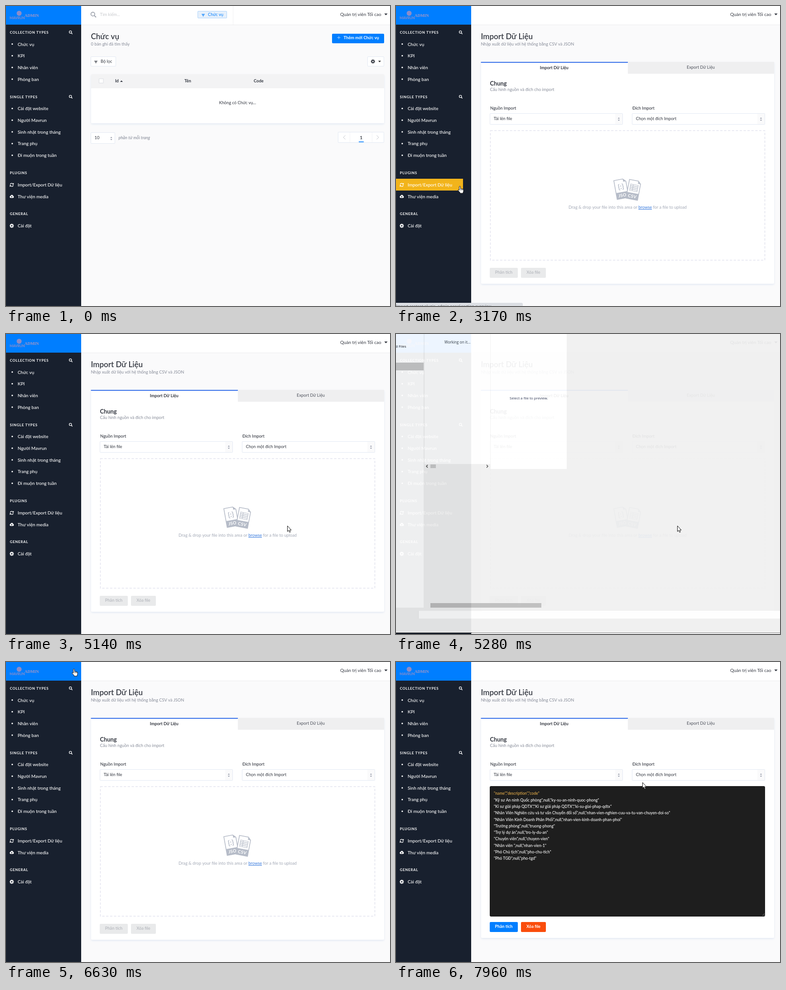
These frames come from a looping animation (848 by 660 pixels, 8 s). An HTML page with a canvas:

```html
<!DOCTYPE html>
<html lang="vi">
<head>
<meta charset="utf-8">
<title>Import</title>
<style>
html, body { margin: 0; width: 100%; height: 100%; overflow: hidden; background: #fafafb; }
canvas { display: block; width: 848px; height: 660px; }
</style>
</head>
<body>
<canvas id="stage" width="848" height="660"></canvas>
<script>
const W = 848, H = 660, LOOP = 8000;
const BLUE = '#007eff', INK = '#333740', MUTED = '#868b98', EDGE = '#e3e9f3';
const UI = 'Lato, sans-serif', WIN = '"Open Sans", sans-serif', MONO = '"DejaVu Sans Mono", monospace';
const stage = document.getElementById('stage').getContext('2d');
const layerCanvas = document.createElement('canvas');
layerCanvas.width = W;
layerCanvas.height = H;
const layer = layerCanvas.getContext('2d');
let g = stage;

const rows = [
  ['Kỹ sư An ninh Quốc phòng', '', 'ky-su-an-ninh-quoc-phong'],
  ['Kĩ sư giải pháp QDTX', 'Kĩ sư giải pháp QDTX', 'ki-su-giai-phap-qdtx'],
  ['Nhân Viên Nghiên cứu và tư vấn Chuyển đổi số', '', 'nhan-vien-nghien-cuu-va-tu-van-chuyen-doi-so'],
  ['Nhân Viên Kinh Doanh Phân Phối', '', 'nhan-vien-kinh-doanh-phan-phoi'],
  ['Trưởng phòng', '', 'truong-phong'],
  ['Trợ lý dự án', '', 'tro-ly-du-an'],
  ['Chuyên viên', '', 'chuyen-vien'],
  ['Nhân viên ', '', 'nhan-vien-1'],
  ['Phó Chủ tịch', '', 'pho-chu-tich'],
  ['Phó TGĐ', '', 'pho-tgd']
].map(([name, about, code]) => `"${name}",${about ? `"${about}"` : 'null'},"${code}"`);

// Drawing helpers
function rect(x, y, w, h, color, r = 0) {
  g.fillStyle = color;
  g.beginPath();
  g.roundRect(x, y, w, h, r);
  g.fill();
}
function box(x, y, w, h, fill = '#fff', edge = EDGE, r = 2) {
  rect(x, y, w, h, edge, r);
  rect(x + 1, y + 1, w - 2, h - 2, fill, Math.max(0, r - 1));
}
function text(s, x, y, size = 9.3, color = INK, { weight = 400, font = UI, align = 'left', style = '', gap = 0 } = {}) {
  g.font = `${style} ${weight} ${size}px ${font}`;
  g.textAlign = align;
  g.letterSpacing = gap + 'px';
  g.fillStyle = color;
  g.fillText(s, x, y);
  return g.measureText(s).width;
}
function line(points, color, width = 1) {
  g.strokeStyle = color;
  g.lineWidth = width;
  g.beginPath();
  points.forEach(([x, y]) => g.lineTo(x, y));
  g.stroke();
}
function poly(points, color) {
  g.fillStyle = color;
  g.beginPath();
  points.forEach(([x, y]) => g.lineTo(x, y));
  g.fill();
}
function dot(x, y, r, color) {
  g.fillStyle = color;
  g.beginPath();
  g.arc(x, y, r, 0, 7);
  g.fill();
}
const caret = (x, y, w, h, color = INK) => poly([[x - w, y], [x + w, y], [x, y + h]], color);
function card(x, y, w, h) {
  g.save();
  g.shadowColor = '#e3e9f3';
  g.shadowBlur = 4;
  g.shadowOffsetY = 2;
  rect(x, y, w, h, '#fff', 2);
  g.restore();
}

// Icons
function magnifier(x, y, r, color, width) {
  g.strokeStyle = color;
  g.lineWidth = width;
  g.beginPath();
  g.arc(x - r * .3, y - r * .3, r, 0, 7);
  g.stroke();
  line([[x + r * .45, y + r * .45], [x + r * 1.4, y + r * 1.4]], color, width * 1.2);
}
function funnel(x, y, color) {
  [7, 5, 3, 1].forEach((w, i) => rect(x - w / 2, y - 2.5 + i * 1.6, w, 1, color));
}
function gear(x, y, r, color, hole) {
  for (let i = 0; i < 8; i++) {
    const a = i * Math.PI / 4;
    line([[x, y], [x + Math.cos(a) * r, y + Math.sin(a) * r]], color, 1.7);
  }
  dot(x, y, r * .74, color);
  dot(x, y, r * .34, hole);
}
function sync(x, y, color) {
  for (const s of [1, -1]) {
    g.save();
    g.translate(x, y);
    g.scale(s, s);
    g.strokeStyle = color;
    g.lineWidth = 1.3;
    g.beginPath();
    g.arc(0, 0, 3.4, Math.PI * 1.05, Math.PI * 1.8);
    g.stroke();
    poly([[4.4, -4.4], [4.4, -.8], [.9, -.8]], color);
    g.restore();
  }
}
function cloud(x, y) {
  dot(x - 2.2, y + 1, 2.3, '#fff');
  dot(x + .3, y - .8, 2.8, '#fff');
  dot(x + 2.5, y + 1.1, 2.2, '#fff');
  rect(x - 2.2, y + 1, 4.8, 2.3, '#fff');
  poly([[x - 1.7, y + .8], [x, y - 1.3], [x + 1.7, y + .8]], '#18202e');
  rect(x - .6, y + .5, 1.2, 1.7, '#18202e');
}
function spinner(x, y, color = '#8b91a0') {
  poly([[x - 2.2, y - 1.3], [x + 2.2, y - 1.3], [x, y - 3.8]], color);
  caret(x, y + 1.3, 2.2, 2.5, color);
}
function paper(x, y, turn, label, inside) {
  const tone = '#b6bcc8';
  g.save();
  g.translate(x, y);
  g.rotate(turn);
  g.beginPath();
  [[-13, -21], [7, -21], [13, -15], [13, 21], [-13, 21]].forEach(([a, b]) => g.lineTo(a, b));
  g.closePath();
  g.fillStyle = '#fff';
  g.fill();
  g.strokeStyle = tone;
  g.lineWidth = 1.6;
  g.stroke();
  poly([[7, -21], [13, -15], [7, -15]], tone);
  rect(-13, 7, 26, 14, tone);
  text(label, 0, 17.5, 9.5, '#fff', { weight: 700, align: 'center', gap: .4 });
  inside(tone);
  g.restore();
}

// Page
function sidebar(hover) {
  rect(0, 0, 166, H, '#18202e');
  rect(0, 0, 166, 41, BLUE);
  dot(29, 16, 5.5, '#8c8cc8');
  text('MAVRUN', 8, 29, 7.6, '#8c8cc8', { weight: 700 });
  text('ADMIN', 41, 23.5, 9, '#a596c4', { weight: 700, font: '"Liberation Serif", serif' });

  const title = (s, y) => text(s, 8.5, y + 2.8, 7.9, '#e9eaeb', { weight: 800, gap: .7 });
  const item = (s, y) => text(s, 25.7, y + 3.5, 10, '#fff', { weight: 500 });
  const group = (name, y, items) => {
    title(name, y);
    magnifier(143, y, 2.6, '#fff', 1.2);
    items.forEach((s, i) => {
      const iy = y + 26 + i * 25.75;
      dot(13.8, iy - .3, 1.6, '#fff');
      item(s, iy);
    });
  };
  group('COLLECTION TYPES', 58, ['Chức vụ', 'KPI', 'Nhân viên', 'Phòng ban']);
  group('SINGLE TYPES', 199.7, ['Cài đặt website', 'Người Mavrun', 'Sinh nhật trong tháng', 'Trang phụ', 'Đi muộn trong tuần']);
  title('PLUGINS', 367);
  if (hover) rect(0, 380, 148, 26, '#f2b41b');
  sync(12.7, 393.5, '#fff');
  item('Import/Export Dữ liệu', 393);
  cloud(12.7, 419);
  item('Thư viện media', 419);
  title('GENERAL', 457.3);
  gear(12.7, 483.5, 4.7, '#fff', '#18202e');
  item('Cài đặt', 483.3);
}
function topbar() {
  rect(166, 0, W, H, '#fafafb');
  rect(166, 41, W, 1, '#ececee');
  rect(166, 0, W, 41, '#fff');
  text('Quản trị viên Tối cao', 738, 22, 10, INK);
  caret(839, 16.5, 3.6, 4);
}
function heading(title, sub) {
  text(title, 187.5, 73, 17, INK, { weight: 600 });
  text(sub, 187.5, 87, 9.3, MUTED);
}
function listPage() {
  magnifier(193, 19, 4.2, '#9ba0aa', 1.7);
  text('Tìm kiếm...', 207.5, 22, 9.3, '#c6c8cc');
  box(423, 11, 65, 16, '#e6f0fb', '#aed4fb');
  funnel(435.5, 20, BLUE);
  text('Chức vụ', 446, 22, 9.3, BLUE);
  rect(501, 0, 1, 41, '#f0f0f2');
  heading('Chức vụ', '0 bản ghi đã tìm thấy');

  rect(720, 61, 115, 21, BLUE, 2);
  line([[731.5, 69.5], [738.5, 69.5]], '#bcdcff', .9);
  line([[735, 66], [735, 73]], '#bcdcff', .9);
  text('Thêm mới Chức vụ', 745.5, 73, 9.3, '#fff', { weight: 700 });
  box(187, 111, 56, 22);
  funnel(198.5, 123, INK);
  text('Bộ lọc', 209, 125.3, 9.3);
  box(798, 111, 37, 22);
  gear(810.3, 122, 4.6, INK, '#fff');
  caret(825, 120.5, 3, 3.3, '#222');

  card(188, 150, 647, 108);
  rect(188, 150, 647, 31, '#f3f3f4', [2, 2, 0, 0]);
  box(205, 159.5, 10.5, 10.5, '#fdfdfd', '#dcdee3', 1);
  const bold = { weight: 700 };
  text('Id', 241, 167.5, 9.3, INK, bold);
  poly([[252, 167], [258, 167], [255, 163.7]], INK);
  text('Tên', 394, 167.5, 9.3, INK, bold);
  text('Code', 547, 167.5, 9.3, INK, bold);
  text('Không có Chức vụ...', 511.3, 215.5, 9.3, INK, { align: 'center' });

  box(187, 278, 54, 25);
  text('10', 195.5, 293, 9.3);
  spinner(232.5, 291.5);
  text('phần tử mỗi trang', 248.5, 293, 9.3, '#7f8492', { style: 'italic' });
  box(733, 277, 102, 24);
  rect(759, 278, 1, 22, '#f1f2f5');
  rect(808, 278, 1, 22, '#f1f2f5');
  line([[749.5, 284.5], [745, 289], [749.5, 293.5]], '#c3c6cc');
  line([[818.5, 284.5], [823, 289], [818.5, 293.5]], '#c3c6cc');
  text('1', 784.3, 293, 9.5, INK, { weight: 700, align: 'center' });
  rect(779, 298, 11, 1.6, BLUE);
}
function picker(label, value, x) {
  text(label, x, 228.3, 9.3, INK, { weight: 500 });
  box(x - 1, 236, 294, 25);
  rect(x + 276, 237, 16, 23, '#fafafb');
  text(value, x + 7.7, 251.2, 9.3);
  spinner(x + 284, 249);
}
function button(s, x, y, w, fill, color) {
  rect(x, y, w, 22, fill, 2);
  text(s, x + w / 2, y + 12.6, 9.3, color, { weight: fill === '#e9eaeb' ? 500 : 700, align: 'center' });
}
function dropArea() {
  g.strokeStyle = '#e3e4ef';
  g.lineWidth = 1.6;
  g.setLineDash([5.2, 3.4]);
  g.strokeRect(208.5, 274.3, 606, 285);
  g.setLineDash([]);
  paper(497.5, 402.5, -.18, 'JSO', c => {
    text('{:}', 0, 0, 15, c, { weight: 700, align: 'center' });
  });
  paper(524.5, 404.5, .19, 'CSV', c => {
    rect(-9, -12, 18, 15, c);
    for (let i = 0; i < 4; i++) {
      rect(-8, -11 + i * 3.6, 5, 2.3, '#fff');
      rect(-2, -11 + i * 3.6, 10, 2.3, '#fff');
    }
  });
  const grey = '#a3a9b6';
  let x = 381;
  x += text('Drag & drop your file into this area or ', x, 446, 9.3, grey);
  const w = text('browse', x, 446, 9.3, '#3478dd');
  rect(x, 447, w, 1, '#3478dd');
  text(' for a file to upload', x + w, 446, 9.3, grey);
}
function codeArea() {
  const medium = { weight: 500 };
  rect(207, 273, 608, 287, '#1e1e1e', 3);
  text('"name","description","code"', 216, 292.3, 8.65, '#e9b04a', medium);
  rows.forEach((s, i) => text(s, 216, 306.6 + i * 14.3, 8.65, '#fff', medium));
  line([[809, 558], [814, 553]], '#888', .8);
  line([[812, 558], [814, 556]], '#888', .8);
}
function importPage(loaded) {
  const lift = loaded ? 4 : 0;
  heading('Import Dữ Liệu', 'Nhập xuất dữ liệu với hệ thống bằng CSV và JSON');
  card(188, 123, 647, 488 - lift);
  rect(512, 123, 323, 26, '#efeff0');
  rect(187.5, 123, 324.5, 1.7, '#1c5de7');
  text('Import Dữ Liệu', 349.3, 138.6, 9.3, INK, { weight: 700, align: 'center' });
  text('Export Dữ Liệu', 673, 138, 9.3, '#4d515b', { align: 'center' });
  text('Chung', 207.5, 174.5, 12.9, INK, { weight: 700 });
  text('Cấu hình nguồn và đích cho import', 207.5, 186.8, 9.3, MUTED);
  picker('Nguồn Import', 'Tải lên file', 208);
  picker('Đích Import', 'Chọn một đích Import', 522);
  if (loaded) codeArea(); else dropArea();
  button('Phân tích', 207, 576 - lift, 62, loaded ? BLUE : '#e9eaeb', loaded ? '#fff' : '#b1b4ba');
  button('Xóa file', 276, 576 - lift, 55, loaded ? '#fa4d0c' : '#e9eaeb', loaded ? '#fff' : '#b1b4ba');
}
function statusBubble(w) {
  rect(0, 653, w, 8, '#dcdfe4', [0, 3, 0, 0]);
  g.save();
  g.beginPath();
  g.rect(0, 653, w - 8, 7);
  g.clip();
  text('Import content plugin, admin panel section overview', 0, 664, 8.6, '#55585e', { font: WIN });
  g.restore();
}

// File dialog
function scrollbar(x, y, w, h, thumbX, thumbW) {
  rect(x, y, w, h, '#f0f0f0');
  rect(thumbX, y + 1, thumbW, h - 2, '#c8c8c8');
  const m = y + h / 2;
  line([[x + 8, m - 3], [x + 5, m], [x + 8, m + 3]], '#333', 1.3);
  line([[x + w - 8, m - 3], [x + w - 5, m], [x + w - 8, m + 3]], '#333', 1.3);
}
function dialogFrame() {
  rect(-10, -10, W + 20, 669, '#f0f0f0');
  rect(-10, 659, 870, 1, '#777');
  rect(-10, 659, 176, 1, '#111');
  box(48, 611, 820, 17, '#fff', '#a0a0a0', 0);
}
function openingDialog() {
  g.save();
  g.translate(1.7, -2);
  dialogFrame();
  rect(48, 611, 820, 17, '#fff');
  g.restore();
  rect(0, 0, 61, 602, '#fff');
  rect(62, 0, 147, 286, '#fff');
  rect(209, 0, 168, 297, '#fff');
  rect(62, 0, 1, 286, '#eee');
  rect(208, 0, 1, 297, '#f2f2f2');
  rect(0, 63, 61, 17, '#c8c8c8');
  scrollbar(62, 286, 146, 10, 76, 12);
  rect(76, 592, 245, 10, '#bdbdbd');
  const o = { font: WIN };
  text('d Files', -1, 29.5, 8, '#111', o);
  text('Working on it...', 107, 20.5, 8.2, '#333', o);
  text('Select a file to preview.', 251, 143.5, 8, '#222c4a', o);
}
function sheetIcon(x, y) {
  box(x + 3, y, 9, 11, '#fff', '#b5b5b5', 0);
  rect(x, y + 2, 7, 7, '#1f7244');
}
function fileDialog(t) {
  const picked = t >= 5880, o = { font: WIN };
  dialogFrame();
  rect(0, 0, 60, 604, '#fff');
  rect(61, 0, 339, 604, '#fff');
  rect(400, 0, 448, 604, '#fff');
  rect(400, 0, 1, 604, '#f8f8f8');
  rect(0, 217, 59.5, 17, '#d9d9d9');
  text('l Files', -3, 27.5, 8.2, '#222', o);
  text(')', -1, 211.5, 8.2, '#222', o);
  scrollbar(61, 592, 339, 12, 74, 246);
  text('File name:', 5, 622.5, 8.3, '#111', o);

  g.save();
  g.beginPath();
  g.rect(61, 0, 339, 590);
  g.clip();
  if (t < 5410) text('Working on it...', 205, 17, 8.2, '#333', o);
  else {
    if (picked) box(72, 4, 340, 16, '#cce8ff', '#99d1ff', 0);
    else if (t >= 5810) rect(72, 4, 340, 16, '#e5f3ff');
    ['chuc-vu:34', 'nhan-vien:39', 'phong-ban:40'].forEach((s, i) => {
      const [name, min] = s.split(':'), y = 15 + i * 15;
      sheetIcon(75, y - 8.5);
      text(name + '.csv', 89.5, y, 8.6, '#1a1a1a', o);
      text(`7/2/2021 12:${min} PM`, 261, y, 8.05, '#6d6d6d', o);
      text('Grantorix Tabu', 347, y, 8.2, '#6d6d6d', o);
    });
  }
  g.restore();

  if (picked) {
    text('chuc-vu.csv', 51, 622.8, 8.6, '#111', o);
    const ys = [-2, 9, 20, 31, 43, 53, 62.5, 72, 82.5, 92];
    rows.forEach((s, i) => text(s, 406, ys[i] + 3.2, 9.5, '#000', { font: MONO }));
  } else text('Select a file to preview.', 801, 297, 8, '#222c4a', o);
}

// Pointer: start, end, steps, destination
const moves = [
  [530, 600, 2, 832, 650],
  [1460, 2210, 12, 148, 400],
  [2280, 2550, 4, 139, 392],
  [2760, 2960, 3, 141, 396],
  [4160, 4440, 5, 621, 415],
  [4580, 4910, 4, 622, 422],
  [5410, 5810, 7, 150, 15],
  [6760, 7090, 6, 432, 319],
  [7680, 7960, 5, 545, 265]
];
const ease = p => p * p * (3 - 2 * p);
function pointerAt(t) {
  let x = 844, y = 658;
  for (const [from, to, n, nx, ny] of moves) {
    if (t < from) break;
    const step = Math.floor((t - from) / (to - from) * (n - 1) + .01) + 1;
    const p = ease(Math.min(1, step / n));
    x += (nx - x) * p;
    y += (ny - y) * p;
  }
  return [x, y];
}
const arrow = new Path2D('M-.5 0V12.6L2.2 10 4.2 14.4 6.2 13.5 4.3 9.3H8Z');
const hand = new Path2D('M-1.3 1.2Q0-.5 1.3 1.2V6Q2.9 5 3.7 6.4 5.3 5.6 6 7 7.6 6.4 8 8V11.5Q8 13 7 14.4V16H.4V14.5L-3.9 9.8Q-4.3 8.1-2.8 8.1L-1.3 9.4Z');
function pointer(x, y, kind) {
  g.save();
  g.translate(Math.round(x), Math.round(y));
  if (kind === 'beam') {
    rect(-.5, -7, 1, 14, '#fff');
    rect(-3, -8, 2.5, 1, '#fff');
    rect(.5, -8, 2.5, 1, '#fff');
    rect(-3, 7, 2.5, 1, '#fff');
    rect(.5, 7, 2.5, 1, '#fff');
  } else {
    const shape = kind === 'hand' ? hand : arrow;
    g.fillStyle = '#fff';
    g.strokeStyle = '#111';
    g.lineWidth = 1;
    g.fill(shape);
    g.stroke(shape);
    if (kind === 'hand') for (const k of [1.3, 3.7, 6]) line([[k, 6.5], [k, 9.5]], '#111', .8);
  }
  g.restore();
}

const fades = [[5190, .45], [5280, .93], [5340, 1], [6480, .6], [6550, .2], [6630, 0]];
const dialogAlpha = t => fades.reduce((a, [at, v]) => t >= at ? v : a, 0);

function draw(t) {
  const [x, y] = pointerAt(t);
  const alpha = dialogAlpha(t), loaded = t >= 6760;
  const onItem = t >= 2280 && x < 147 && y > 380 && y < 406;
  g = stage;
  g.clearRect(0, 0, W, H);
  topbar();
  sidebar(onItem);
  if (t < 3170) listPage(); else importPage(loaded);
  if (t >= 2280 && t < 4300) statusBubble(t < 2760 ? 201 : 280);

  if (alpha) {
    g = layer;
    g.clearRect(0, 0, W, H);
    if (t < 5340) openingDialog(); else fileDialog(t);
    g = stage;
    g.globalAlpha = alpha;
    g.drawImage(layerCanvas, 0, 0);
    g.globalAlpha = 1;
  }
  if (t < 530) return;
  const onLogo = x < 166 && y < 41;
  const onCode = loaded && x > 208 && x < 815 && y > 274 && y < 559;
  pointer(x, y, alpha ? 'arrow' : onItem || onLogo ? 'hand' : onCode ? 'beam' : 'arrow');
}
function tick() {
  draw(performance.now() % LOOP);
  requestAnimationFrame(tick);
}
tick();
</script>
</body>
</html>
```
